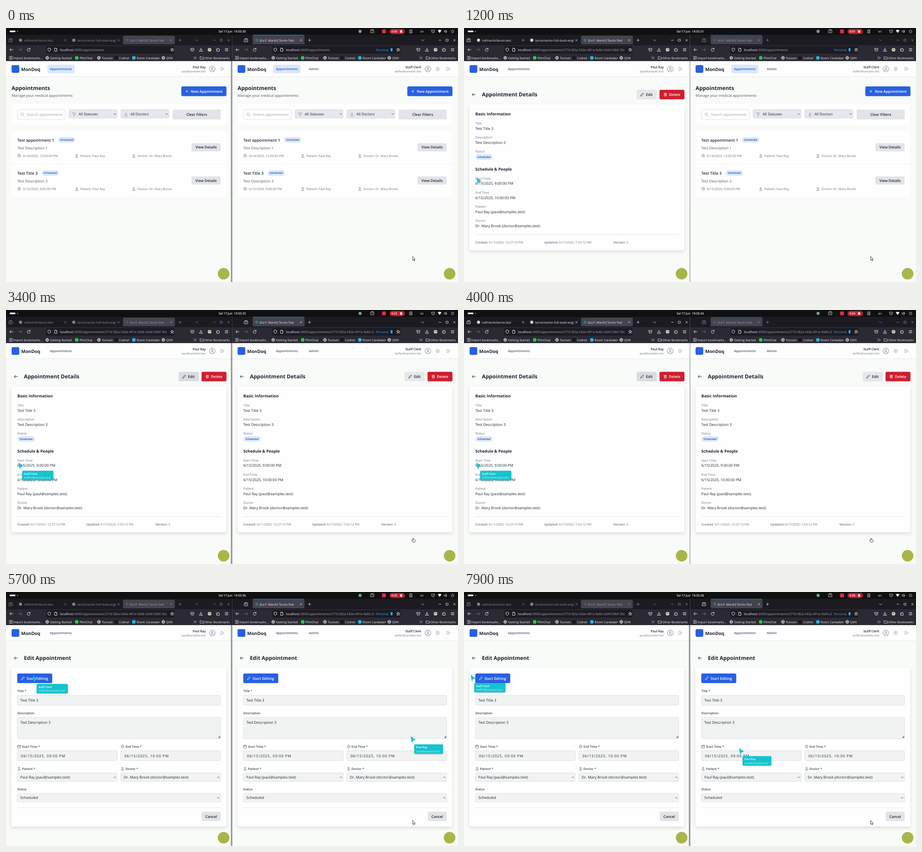
An HTML page that plays this animation: 997 px wide and 561 px high, repeating every 8000 ms.

```html
<!DOCTYPE html>
<html lang="en">
<head>
<meta charset="utf-8">
<title>Appointments side by side</title>
<style>
html, body { margin: 0; width: 100%; height: 100%; overflow: hidden; background: #f9fbf9; }
svg { display: block; }
text { font-family: "Open Sans", "Noto Sans", sans-serif; white-space: pre; text-rendering: geometricPrecision; }
.ic { fill: none; stroke-linecap: round; stroke-linejoin: round; }
.card { fill: #fefefe; filter: drop-shadow(0 .5px .7px #0001); }
.deep { fill: #fefefe; filter: drop-shadow(0 3px 3.5px #0000001f); }
</style>
</head>
<body>
<svg id="stage" width="997" height="561" viewBox="0 0 997 561"></svg>
<script>
const LOOP = 8000, STEP = 100, SHIFT = 498.5;
const INK = '#1b2430', MID = '#4b5563', SOFT = '#6b7280', LINE = '#d1d5db',
      GREY = '#e5e7eb', BLUE = '#2860e1', CYAN = '#15c3ce', LIGHT = '#f4f4f8', PAGE = '#f9fbf9';
const PATIENT = 'Paul Ray', DOCTOR = 'Dr. Mary Brook', CLERK = 'Staff Clerk';
const MAIL = { patient: 'paul@samples.test', clerk: 'staffer@samples.test', doctor: 'doctor@samples.test' };

const circle = (r, x = 0, y = 0) =>
  `M${x - r} ${y}a${r} ${r} 0 1 0 ${2 * r} 0a${r} ${r} 0 1 0 ${-2 * r} 0`;
const ICONS = {
  person: circle(1.6, 0, -1.6) + 'M-2.6 3.4C-2.6 .2 2.6 .2 2.6 3.4Z',
  clock: circle(3.2) + 'M0-1.9V.2L1.4 1',
  globe: circle(3.4) + 'M-3.4 0H3.4M0-3.4Q-3 0 0 3.4Q3 0 0-3.4',
  star: 'M0-3.6 1-1.1 3.6-1 1.6.7 2.3 3.3 0 1.8-2.3 3.3-1.6.7-3.6-1-1-1.1Z',
  shield: 'M0-3.6 3-2.5V0Q2.8 2.5 0 3.8Q-2.8 2.5-3 0V-2.5Z',
  page: 'M-2.4-3.5H.7L2.4-1.8V3.5H-2.4ZM.6-3.4V-1.7H2.3',
  back: 'M3.6 0H-3.6M-.6-3-3.6 0-.6 3',
  forward: 'M-3.6 0H3.6M.6-3 3.6 0 .6 3',
  reload: 'M2.6-2A3.3 3.3 0 1 0 3.3 .8M3.2-3.7V-1.4H.9',
  pocket: 'M-3.3-2.8H3.3V0A3.3 3.3 0 0 1-3.3 0ZM-1.5-.7 0 .8 1.5-.7',
  down: 'M0-3.6V1.2M-2.1-.9 0 1.2 2.1-.9M-3.3 1.6V3.5H3.3V1.6',
  puzzle: 'M-3-1.6H-1A1.1 1.1 0 1 1 1-1.6H3V3.3H-3V1.7A1 1 0 1 0-3-.2Z',
  menu: 'M-3.2-2.5H3.2M-3.2 0H3.2M-3.2 2.5H3.2',
  close: 'M-2-2 2 2M2-2-2 2',
  plus: 'M-2.7 0H2.7M0-2.7V2.7',
  chevron: 'M-1.8-.8 0 1 1.8-.8',
  wide: 'M-3-1.4 0 1.6 3-1.4',
  minus: 'M-2.3 0H2.3',
  box: 'M-2.2-2.2H2.2V2.2H-2.2Z',
  pane: 'M-3.6-2H3.6V3.5H-3.6ZM-2.6-3.6H2.6M-1.2.7H1.2',
  folder: 'M-3.6-2.5H-1L0-1.4H3.6V2.8H-3.6Z',
  enter: 'M-3.4-2.8V-3.2H3.4V3.2H-3.4V2.8M-3.6 0H1M-.8-1.8 1 0-.8 1.8',
  more: 'M-3-2.5-.5 0-3 2.5M.5-2.5 3 0 .5 2.5',
  search: circle(2.8, -.6, -.6) + 'M1.5 1.5 3.8 3.8',
  funnel: 'M-3.6-3.2H3.6L.9.4V2.5L-.9 3.8V.4Z',
  pencil: 'M-3.3 3.3-2.7 1 2-3.5 3.4-2-1.1 2.7Z',
  trash: 'M-3.1-2H3.1M-1-2V-3.2H1V-2M-2.4-2-2 3.4H2L2.4-2M-.8-.3V1.8M.8-.3V1.8',
  calendar: 'M-3.1-2.4H3.1V3.2H-3.1ZM-3.1-.7H3.1M-1.6-3.4V-2.4M1.6-3.4V-2.4',
  exit: 'M1-2V-3.5H-3.2V3.5H1V2M-1 0H3.8M2.2-1.7 3.9 0 2.2 1.7',
  gear: circle(1.3) + 'M-1-3.7H1L1.4-2.5 2.6-3 3.7-1.2 2.8 0 3.7 1.2 2.6 3 1.4 2.5 1 3.7H-1L-1.4 2.5-2.6 3-3.7 1.2-2.8 0-3.7-1.2-2.6-3-1.4-2.5Z',
  avatar: circle(6.4) + circle(2.1, 0, -1.6) + 'M-3.8 4.7C-3.2.8 3.2.8 3.8 4.7',
  power: 'M1.7-2.3A3 3 0 1 1-1.7-2.3M0-3.6V-.3',
  clip: 'M-2.5-2.8H2.5V3.5H-2.5ZM-1-3.6H1M-1.2-.5H1.2M-1.2 1.5H1.2',
  sound: 'M-3-1.2H-1.4L.5-3V3L-1.4 1.2H-3ZM2-1.5Q3 0 2 1.5'
};

const icon = (name, x, y, color = SOFT, w = .8) =>
  `<path class="ic" d="${ICONS[name]}" transform="translate(${x} ${y})" stroke="${color}" stroke-width="${w}"/>`;
const text = (x, y, s, size = 8, fill = INK, weight = 400, anchor = 'start', extra = '') =>
  `<text x="${x}" y="${y}" font-size="${size}" fill="${fill}" font-weight="${weight}" text-anchor="${anchor}" ${extra}>${s}</text>`;
const rect = (x, y, w, h, fill, r = 0, extra = '') =>
  `<rect x="${x}" y="${y}" width="${w}" height="${h}" rx="${r}" fill="${fill}" ${extra}/>`;
const dot = (x, y, r, fill) => `<circle cx="${x}" cy="${y}" r="${r}" fill="${fill}"/>`;
const rule = y => rect(25, y, 448.5, .6, LINE);
const crop = (x, y, w, h, inner) =>
  `<svg x="${x}" y="${y}" width="${w}" height="${h}" viewBox="${x} ${y} ${w} ${h}">${inner}</svg>`;
const field = (x, y, w, h, fill = '#f1f3f2') =>
  rect(x, y, w, h, fill, 3, `stroke="${LINE}" stroke-width=".7"`);
const badge = (x, y) => rect(x, y, 38.5, 12, '#dbe8fc', 6) +
  text(x + 19.25, y + 8.2, 'Scheduled', 5.8, '#2346a8', 600, 'middle');
const pair = (y, label, value) =>
  text(25, y, label, 7, SOFT) + (value ? text(25, y + 11.8, value, 8.05) : '');

function tabBar(admin) {
  const tab = (x, title) => icon('close', x + 106.5, 27, LIGHT, .7) + dot(x + 9, 27, 3.4, '#35707f') +
    crop(x + 15.5, 18, 84, 18, text(x + 15.5, 29.5, title, 6.7, LIGHT));
  const title = '[Ira F. Marsh] TarvIo-Test';
  if (admin) return icon('pane', 31, 27, LIGHT) + rect(46, 15.2, 113, 1.2, '#2f9be8') + tab(45.5, title) +
    icon('plus', 171, 27, LIGHT) + icon('wide', 420.5, 27, LIGHT) + icon('minus', 458.5, 27, LIGHT) +
    icon('box', 474.5, 27, LIGHT) + icon('close', 490.5, 27, LIGHT);
  const site = (x, s, w) => dot(x, 27, 3.4, '#d8d8de') + crop(x + 7.5, 18, w, 18, text(x + 7.5, 29.5, s, 6.7, LIGHT));
  return icon('pane', 10.5, 27, LIGHT) + site(32, 'irafmarsh/tarvio-test', 76) + icon('close', 130.5, 27, LIGHT, .7) +
    site(149.5, 'tarvio/senior-full-stack-engineer', 85) + icon('close', 248, 27, LIGHT, .7) + tab(258, title) +
    icon('plus', 384, 27, LIGHT) + icon('wide', 420.5, 27, LIGHT) + icon('minus', 459.5, 27, LIGHT) +
    icon('box', 475, 27, LIGHT) + icon('close', 491, 27, LIGHT);
}

function chrome(admin) {
  const bar = [['back', 12], ['reload', 50], ['shield', 95.5], ['page', 110], ['star', 366.5], ['pocket', 411],
    ['down', 430], ['puzzle', 467.5], ['menu', 486.5]];
  const marks = [[205, 'globe', 'Tunovix'], [91, 'globe', 'Getting Started'], [347, 'globe', 'QVN'],
    [156, '#2fc45a', 'PlimChat'], [243, '#16161c', 'Codnel'], [282, '#2bb3de', 'Room Caretaker']];
  return rect(0, 15, 499, 23, '#1c1b22') + rect(0, 38, 499, 35.5, '#2b2a33') +
    rect(admin ? 45.5 : 258, 17, 114.5, 19, '#44434e', 2.5) +
    `<g class="tabs">${tabBar(admin)}</g>` +
    rect(89, 40, 282, 16.5, '#1c1b22', 2.5) +
    bar.map(([n, x]) => icon(n, x, 48, LIGHT, .9)).join('') + icon('forward', 31, 48, '#77767f', .9) +
    dot(449, 48, 4, '#cfc9ba') + dot(449, 47, 1.6, '#8d8372') +
    (admin ? text(317.5, 50.7, 'Personal', 6.8, '#37adff') + rect(350, 44.5, 4, 7, '#37adff', 1) : '') +
    icon('enter', 10.5, 66, LIGHT) + text(16, 68.6, 'Import bookmarks…', 6.8, LIGHT) +
    marks.map(([x, kind, s]) => (kind === 'globe' ? icon(kind, x, 66, LIGHT) : dot(x, 66, 4, kind)) +
      text(x + 6.2, 68.6, s, 6.8, LIGHT)).join('') +
    icon('more', 417, 66, LIGHT) + icon('folder', 432, 66, LIGHT) + text(437.3, 68.6, 'Other Bookmarks', 6.8, LIGHT);
}

function header(admin) {
  const right = admin ? 417.5 : 440.5;
  return rect(0, 73.5, 499, 488, PAGE) + rect(0, 73.5, 499, 33.5, '#fefefe') + rect(0, 107, 499, .8, '#e3e5e8') +
    rect(12.3, 82, 17, 17, BLUE, 3) + text(33.5, 94.6, 'MonDoq', 10, INK, 700) +
    (admin ? text(180.5, 93, 'Admin', 7, MID, 600, 'middle') + icon('gear', 453.7, 90.5, '#8b93a1', .7) : '') +
    text(right, 88.6, admin ? CLERK : PATIENT, 7, INK, 600, 'end') +
    text(right, 98.4, admin ? MAIL.clerk : MAIL.patient, 6, SOFT, 400, 'end') +
    icon('avatar', right + 14.5, 90.4, SOFT, .8) + icon('exit', 477, 90.4, '#8b93a1', .7);
}

function address(admin, path) {
  const w = admin ? 194 : 240;
  return crop(119, 40, w, 16, text(119, 50.7,
    `localhost<tspan fill="#a9a8b2">:3000/appointments${path}</tspan>`, 7.1, LIGHT));
}

const navItem = on => (on ? rect(91, 81, 60, 19, '#dbe8fa', 3) : '') +
  text(121, 93, 'Appointments', 7, on ? '#2154cf' : MID, 600, 'middle');

function listView(admin) {
  const row = (y, title, badgeX, desc, time) =>
    text(25, y + 3.6, title, 8.7, INK, 600) + badge(badgeX, y - 6) + text(25, y + 20.6, desc, 8, MID) +
    icon('clock', 29, y + 35) + text(37.5, y + 37.6, time, 7, SOFT) +
    icon('person', 156, y + 35) + text(163.7, y + 37.6, 'Patient: ' + PATIENT, 7, SOFT) +
    icon('person', 282, y + 35) + text(290.3, y + 37.6, 'Doctor: ' + DOCTOR, 7, SOFT) +
    rect(409, y + 7.5, 64.5, 18, '#e2e4e8', 3) + text(441.2, y + 19.4, 'View Details', 8, INK, 600, 'middle');
  const select = (x, name, s) => field(x, 180, 106, 19.3, GREY) + icon(name, x + 11.5, 190.8, '#8b93a1') +
    text(x + 21.2, 192.8, s) + icon('chevron', x + 101, 190, INK, .9);
  return address(admin, '') + navItem(true) +
    text(12.3, 137, 'Appointments', 11.9, INK, 700) + text(12.3, 152, 'Manage your medical appointments', 8, MID) +
    rect(386.7, 129, 99.6, 21.5, BLUE, 3.2) + icon('plus', 399, 140, '#fff') + text(407.5, 143, 'New Appointment', 8, '#fff', 600) +
    rect(12, 168, 474, 46, '#fff', 4, 'class="card"') + field(25, 180, 106, 22, '#fefefe') + icon('search', 36.3, 191, '#9ca3af') +
    crop(46, 182, 78.5, 18, text(46, 194, 'Search appointments…', 8, '#9ca3af')) +
    select(139, 'funnel', 'All Statuses') + select(253.3, 'person', 'All Doctors') +
    rect(367.7, 180, 106, 22, '#e2e4e8', 3) + text(420.6, 194, 'Clear Filters', 8, INK, 600, 'middle') +
    rect(12, 227, 474, 146, '#fff', 4, 'class="card"') + rect(12, 299.7, 474, .7, '#e3e5e8') +
    row(247, 'Test appointment 1', 114.5, 'Test Description 1', '6/14/2025, 12:00:00 PM') +
    row(320.2, 'Test Title 3', 78.5, 'Test Description 3', '6/15/2025, 9:00:00 PM');
}

const UUID = '/2716182a-542e-491e-9afd-c0d41d9d13fa';

function detailView(admin) {
  const note = (x, k, v) => text(x, 476.2, `<tspan font-weight="600">${k}:</tspan> ${v}`, 6.9, SOFT);
  return address(admin, UUID) + navItem(false) +
    icon('back', 21.7, 147, INK, 1) + text(39.5, 151.2, 'Appointment Details', 11.8, INK, 700) +
    rect(380.7, 136.6, 44.5, 21, GREY, 3.2, 'class="edit"') + icon('pencil', 393, 147, INK) + text(401.3, 150, 'Edit', 8, INK, 600) +
    rect(431.3, 136.6, 55, 21, '#cd1f2f', 3.2) + icon('trash', 444, 147, '#fff') + text(452, 150, 'Delete', 8, '#fff', 600) +
    rect(12, 169, 474, 322, '#fff', 4, 'class="deep"') +
    text(25, 193, 'Basic Information', 8.8, INK, 700) +
    pair(213, 'Title', 'Test Title 3') + pair(244.2, 'Description', 'Test Description 3') + pair(275.4, 'Status') + badge(25, 279) +
    text(25, 314.6, 'Schedule &amp; People', 8.8, INK, 700) +
    pair(334.5, 'Start Time', '6/15/2025, 9:00:00 PM') + pair(365.7, 'End Time', '6/15/2025, 10:00:00 PM') +
    pair(396.9, 'Patient', `${PATIENT} (${MAIL.patient})`) + pair(428, 'Doctor', `${DOCTOR} (${MAIL.doctor})`) +
    rule(456) + note(25, 'Created', '6/11/2025, 12:27:13 PM') + note(177, 'Updated', '6/17/2025, 7:53:12 PM') + note(329.5, 'Version', '5');
}

function editView(admin) {
  const label = (x, y, s, name) => (name ? icon(name, x + 4, y - 2.6, MID, .7) : '') +
    text(x + (name ? 10.3 : 0), y, s, 6.8, '#374151', 600);
  const date = (x, s) => field(x, 350.5, 220.3, 22) + text(x + 8, 364.6, s, 8, INK, 400, 'start', 'letter-spacing=".85"');
  const select = (x, y, w, s) => field(x, y, w, 18.8) + text(x + 6.6, y + 12.4, s, 8.05) + icon('chevron', x + w - 5.3, y + 9.6, INK, .9);
  return address(admin, UUID) + navItem(false) +
    icon('back', 21.7, 146, INK, 1) + text(39.5, 150.3, 'Edit Appointment', 11.8, INK, 700) +
    rect(12, 167, 474, 351, '#fff', 4, 'class="deep"') +
    rect(24.8, 179.9, 77.2, 21.4, BLUE, 3.2) + icon('pencil', 37.3, 190.5, '#fff') + text(45.3, 193.6, 'Start Editing', 8, '#fff', 600) +
    label(25, 221.2, 'Title *') + field(25, 228.3, 448.5, 21.7) + text(31.6, 242, 'Test Title 3') +
    label(25, 270.2, 'Description') + field(25, 277, 448.5, 47) + text(31.6, 291, 'Test Description 3') +
    '<path d="M467.5 322.3 472.3 317.5V322.3Z" fill="#777"/>' +
    label(25, 344, 'Start Time *', 'calendar') + date(25, '06/15/2025, 09:00 PM') +
    label(253.2, 344, 'End Time *', 'clock') + date(253.2, '06/15/2025, 10:00 PM') +
    label(25, 392.6, 'Patient *', 'person') + select(25, 399.6, 220.3, `${PATIENT} (${MAIL.patient})`) +
    label(253.2, 392.6, 'Doctor *', 'person') + select(253.2, 399.6, 220.3, `${DOCTOR} (${MAIL.doctor})`) +
    label(25, 438.3, 'Status') + select(25, 445, 448.5, 'Scheduled') +
    rule(476) + rect(431.5, 485.3, 42, 20.7, '#e2e4e8', 3.2) + text(452.5, 498.6, 'Cancel', 8, INK, 600, 'middle');
}

function browser(id, admin) {
  const views = { list: listView, detail: detailView, edit: editView };
  return `<g id="${id}" transform="translate(${admin ? SHIFT : 0})">` + chrome(admin) + header(admin) +
    Object.entries(views).map(([k, f]) => `<g class="view" data-view="${k}">${f(admin)}</g>`).join('') +
    dot(480, 542.8, 12.8, '#a9b548') + '</g>';
}

const peer = (id, name, mail, w) => `<g id="${id}"><path d="M0 0 10 7.6 5 8.6 2.6 13.2Z" fill="${CYAN}" stroke="${CYAN}" stroke-width=".8" stroke-linejoin="round"/>` +
  `<g class="tag">${rect(7.5, 17.6, w, 20.8, CYAN, 2.5, 'style="filter:drop-shadow(0 1px 1.5px #0003)"')}` +
  text(11.5, 26.3, name, 6, '#fff', 600) + text(11.5, 34.7, mail, 6, '#c4f0f3') + '</g></g>';

const topBar = rect(0, 0, 997, 15, '#101012') + rect(8, 5.7, 13, 3.6, '#fff', 1.8) + dot(25.3, 7.5, 1.2, '#8c8c8c') +
  text(499, 9.9, '', 6.6, '#f4f4f4', 600, 'middle', 'id="clock"') +
  dot(781, 7.5, 3.4, '#72a58b') + icon('pane', 808, 7, '#ddd') + rect(829.5, 3.3, 8.4, 8.4, '#e0303c', 1.5) +
  rect(846, 2, 34, 11.5, '#c01c28', 5.7) + text(850, 10, '', 6.6, '#fff', 600, 'start', 'id="rec"') + rect(869, 5.2, 5, 5, '#fff', .6) +
  icon('clip', 893, 7.5, '#ddd') + text(917.5, 9.8, 'en', 6.6, '#eee', 400, 'middle') + icon('pocket', 942, 7.5, '#ddd') +
  '<path d="M952.4 5.4Q956.5 2.2 960.6 5.4L956.5 11Z" fill="#eee"/>' + icon('sound', 970, 7.5, '#eee') + icon('power', 985, 7.5, '#eee');

const pointers = '<g stroke="#1a1a1a" stroke-width=".8" stroke-linejoin="round" fill="#fff">' +
  '<path class="ptr" data-ptr="arrow" d="M897 504.5V513.2L899 511.4 900.4 514.4 901.6 513.8 900.3 510.9H902.7Z"/>' +
  '<path class="ptr" data-ptr="hand" d="M897.2 508.5V504.6Q898 503.6 898.8 504.6V507L902 507.5Q903 508 902.8 509.3L902 512.5H897L894.8 509.5Q894.8 508.2 896 508.5Z"/>' +
  '<g class="ptr" data-ptr="blocked"><circle cx="898" cy="505.7" r="4.6"/><circle cx="898" cy="505.7" r="2.6" fill="#bbb" stroke-width="1"/><path d="M896.3 504 899.7 507.4" stroke-width="1.2"/></g></g>';

const stage = document.getElementById('stage');
stage.innerHTML = '<defs><linearGradient id="edge"><stop stop-color="#000" stop-opacity="0"/><stop offset="1" stop-color="#000" stop-opacity=".5"/></linearGradient></defs>' +
  browser('left', false) + peer('clerk', CLERK, MAIL.clerk, 69) + browser('right', true) +
  rect(494.5, 15, 4, 546, 'url(#edge)', 0, 'id="shade"') + rect(498, 15, .8, 546, '#55565a') +
  peer('patient', PATIENT, MAIL.patient, 63.5) + pointers + topBar;

// Step tables: [start ms, value]
const LEFT = [[0, 'list'], [800, 'detail'], [4100, 'edit']];
const RIGHT = [[0, 'list'], [2800, 'detail'], [5200, 'edit']];
const FOCUS = [[0, 'right'], [700, 'left'], [2700, 'right'], [3900, 'left'], [5100, 'right']];
const POINTER = [[0, 'arrow'], [500, 'hand'], [900, 'arrow'], [2400, 'hand'], [5200, 'arrow'], [6100, 'blocked'], [7200, 'arrow']];
const HOVER = [[0, ''], [3300, 'left'], [4100, ''], [4600, 'right'], [5200, '']];
// Paths: [ms, x, y]
const CLERK_PATH = [[0, 28, 331], [2700, 28, 331], [2800, 28, 337.5], [4200, 28, 337.5], [4600, 396, 206],
  [5100, 396, 206], [5500, 60, 185.5], [5800, 60, 185.5], [6200, 15, 183.3]];
const PATIENT_PATH = [[0, 893, 319], [5800, 893, 319], [6400, 675, 389], [6700, 675, 389], [7700, 607, 345]];

const at = (steps, t) => steps.filter(s => s[0] <= t).pop()[1];
function along(path, t) {
  const i = path.findIndex(p => p[0] > t);
  if (i < 0) return path[path.length - 1].slice(1);
  const [a, b] = [path[i - 1], path[i]];
  const k = (t - a[0]) / (b[0] - a[0]), e = k * k * (3 - 2 * k);
  return [a[1] + (b[1] - a[1]) * e, a[2] + (b[2] - a[2]) * e];
}

const $ = s => stage.querySelector(s);
const all = s => [...stage.querySelectorAll(s)];
const show = (el, on) => { el.style.display = on ? '' : 'none'; };

function draw(t) {
  const focus = at(FOCUS, t), hover = at(HOVER, t), ptr = at(POINTER, t);
  const shown = { left: at(LEFT, t), right: at(RIGHT, t) };
  for (const side of ['left', 'right']) {
    all(`#${side} .view`).forEach(v => show(v, v.dataset.view === shown[side]));
    $(`#${side} .tabs`).style.opacity = focus === side ? 1 : .55;
    $(`#${side} .edit`).setAttribute('fill', hover !== side ? GREY : side === 'left' ? '#d9dde2' : '#cfd2d7');
  }
  show($('#shade'), focus === 'right');
  all('.ptr').forEach(p => show(p, p.dataset.ptr === ptr));
  show($('#clerk'), t >= 900);
  show($('#clerk .tag'), t >= 2800);
  show($('#patient'), t >= 5200);
  $('#clerk').setAttribute('transform', `translate(${along(CLERK_PATH, t)})`);
  $('#patient').setAttribute('transform', `translate(${along(PATIENT_PATH, t)})`);
  $('#clock').textContent = 'Sel 17 Jun  19:55:' + (30 + Math.floor((t + 400) / 1000));
  $('#rec').textContent = '0:0' + Math.floor((t + 200) / 1000);
}

let last = -1;
function tick() {
  const t = Math.floor(performance.now() % LOOP / STEP) * STEP;
  if (t !== last) draw(last = t);
  requestAnimationFrame(tick);
}
tick();
</script>
</body>
</html>
```
